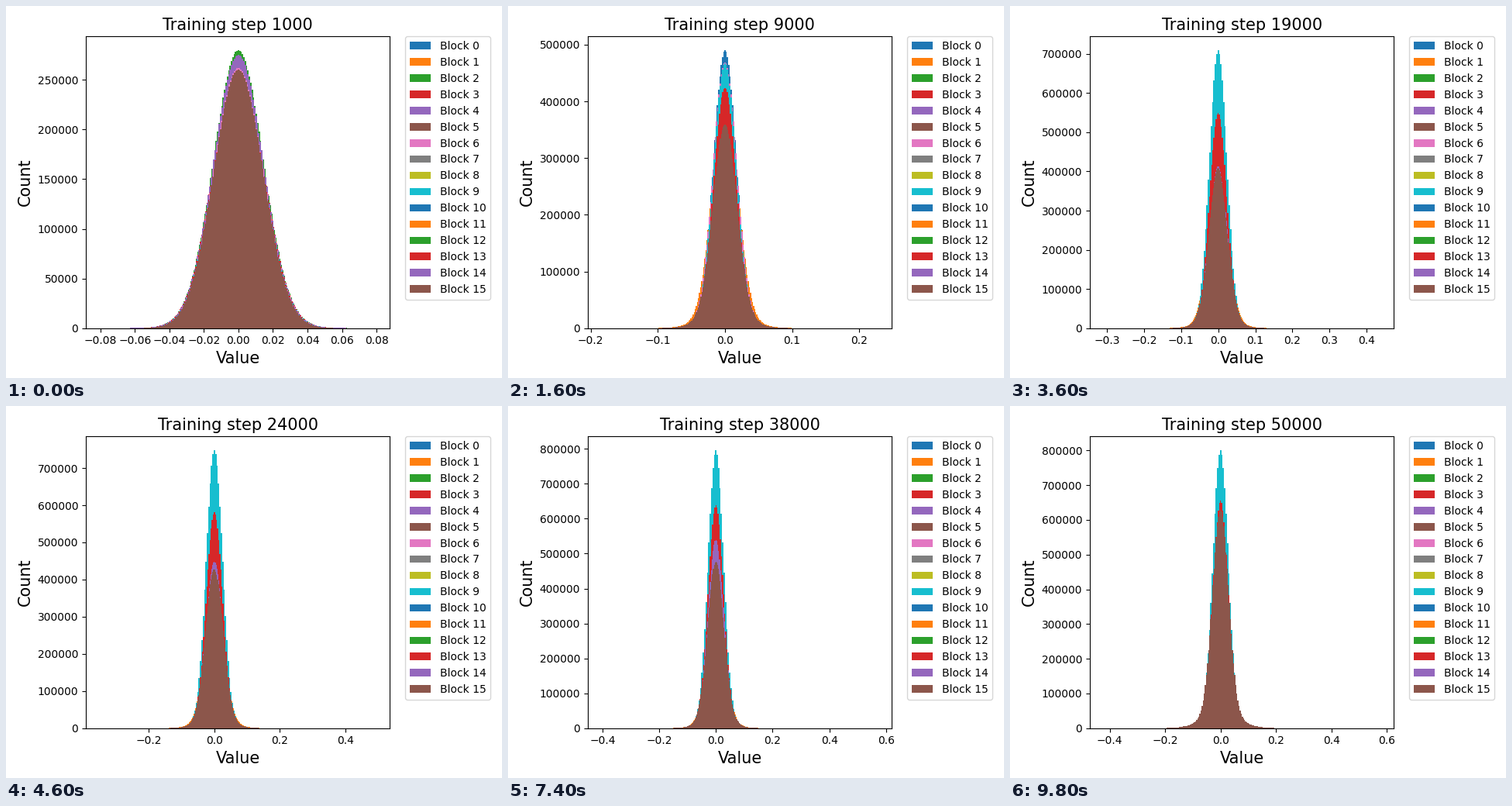
These frames come from a looping animation (640 by 480 pixels, 10000 ms). A matplotlib script:

```python
import numpy as np
import matplotlib.pyplot as plt
from matplotlib.animation import FuncAnimation
from matplotlib.patches import Patch

W, H, DPI = 640, 480, 100
FRAMES, INTERVAL = 50, 200
LAST = FRAMES - 1
LEFT, RIGHT = 103, 495.47

# frame, lowest x, highest x, tallest count in thousands
KEYS = np.array([
    (0, -.0884, .0878, 279.6),
    (4, -.1561, .1581, 482),
    (11, -.2402, .3198, 572.6),
    (18, -.3458, .4736, 709),
    (29, -.431, .588, 776.3),
    (37, -.4515, .621, 795.7),
    (49, -.472, .626, 800.2),
])


def smooth(t):
    """Monotone cubic through the key points."""
    x, v = KEYS[:, 0], KEYS[:, 1:]
    h = np.diff(x)[:, None]
    d = np.diff(v, axis=0) / h
    m = np.vstack([d[:1], 2 * d[:-1] * d[1:] / (d[:-1] + d[1:]), d[-1:]])
    k = min(np.searchsorted(x, t, side="right") - 1, len(h) - 1)
    s = (t - x[k]) / h[k]
    return (v[k] * (1 + 2 * s) * (1 - s) ** 2 + v[k + 1] * s * s * (3 - 2 * s)
            + h[k] * s * (1 - s) * (m[k] * (1 - s) - m[k + 1] * s))


def ramp(t, start, end, length=4):
    return start + (end - start) * min(t / length, 1)


def peaks(t, top):
    """Peak of each visible block, in thousands, in drawing order."""
    late = max(t - 4, 0)
    return {
        0: min(top, 490),
        1: ramp(t, 268, 412),
        2: ramp(t, 279.6, 350),
        3: ramp(t, 272, 402),
        4: ramp(t, 275, 340),
        6: ramp(t, 262, 495, 9),
        7: ramp(t, 255, 387),
        9: min(top, 255 + 16 * t + 21 * late),
        13: min(258 + 16.5 * t + 8.5 * late,
                655 - 158 * ((LAST - t) / 38) ** 2),
        14: 252 + 16 * t ** .8,
        15: 260 + 35 * t ** .5 + 125 * (t / LAST) ** 12,
    }


WIDER = {1: .10, 6: .04, 7: .04, 14: .03, 15: .05}
HEAVY = (1, 15)


def histograms(t):
    """Yield block, counts and bin edges."""
    lo, hi, top = smooth(t)
    sigma = 22.81 * (hi - lo) / top * ramp(t, 1, .88, 8)
    for block, peak in peaks(t, top).items():
        s = sigma * (1 + ramp(t, 0, WIDER.get(block, 0)))
        step = (hi - lo) / 220 * peak / top
        edges = step * (np.arange(202) - 100.5)
        z = (edges[:-1] + edges[1:]) / 2 / s
        a = ramp(t, 0, .06) if block in HEAVY else .01
        spread = 1.8 + .5 * (t / LAST) ** 12
        shape = ((1 - a) * np.exp(-z ** 2 / 2)
                 + a * np.exp(-(z / spread) ** 2 / 2))
        yield block, 1000 * peak * shape, edges


def color(block):
    return f"C{block % 10}"


fig, ax = plt.subplots(figsize=(W / DPI, H / DPI), dpi=DPI)
bars = {b: ax.stairs(counts, edges, fill=True, color=color(b), lw=0)
        for b, counts, edges in histograms(0)}
title = ax.set_title("Training step 1000", fontsize=15)
ax.set_xlabel("Value", fontsize=15)
ax.set_ylabel("Count", fontsize=15)
ax.legend(handles=[Patch(color=color(b), lw=0, label=f"Block {b}")
                   for b in range(16)],
          bbox_to_anchor=(1.05, 1), loc="upper left", borderaxespad=0)
fig.tight_layout()
box = ax.get_position()
ax.set_position([LEFT / W, box.y0, (RIGHT - LEFT) / W, box.height])


def update(i):
    tallest = 0
    for b, counts, edges in histograms(i):
        bars[b].set_data(counts, edges)
        tallest = max(tallest, counts.max())
    ax.set_xlim(*smooth(i)[:2])
    ax.set_ylim(0, 1.05 * tallest)
    title.set_text(f"Training step {1000 * (i + 1)}")
    return [*bars.values(), title]


anim = FuncAnimation(fig, update, frames=FRAMES, interval=INTERVAL,
                     init_func=lambda: update(0), repeat=True, repeat_delay=0)
plt.show()
```
